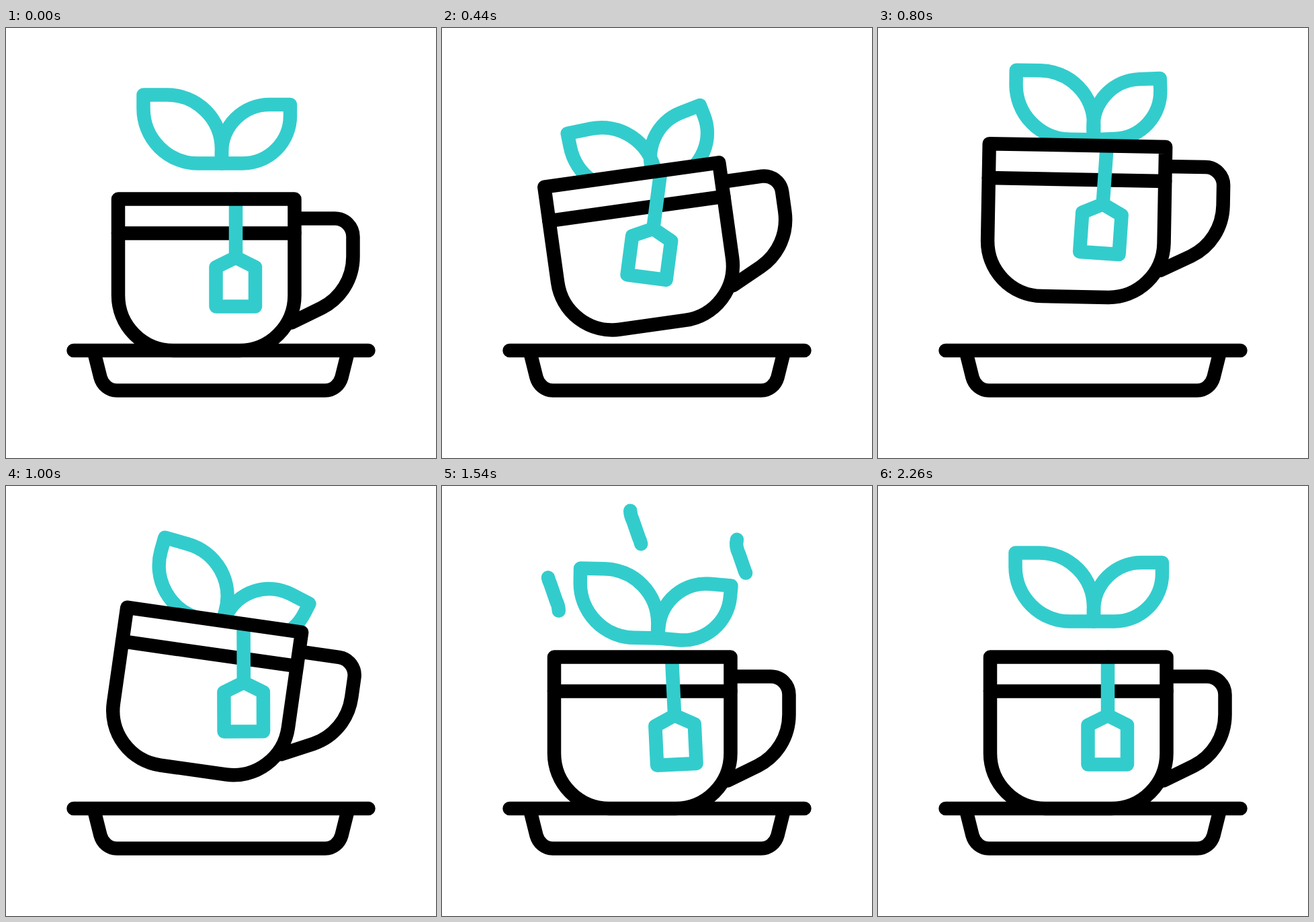
Animation of 640x640 px, one loop 2.4 s. Source, as an HTML page:

```html
<!DOCTYPE html>
<html lang="en">
<head>
<meta charset="utf-8">
<title>Tea cup</title>
<style>
  html, body { margin: 0; width: 100%; height: 100%; overflow: hidden; background: #fff; }
  svg { display: block; width: 100vw; height: 100vh; fill: none; stroke: #000;
        stroke-width: 20.5; stroke-linecap: round; stroke-linejoin: round; }
  .tea { stroke: #3cc; }
</style>
</head>
<body>
<svg viewBox="0 0 640 640">
  <g class="tea">
    <path id="leftLeaf" d="M204.5 99.5H240A81 81 0 0 1 321 180.5V201.5H286A81.5 81.5 0 0 1 204.5 120Z"/>
    <path id="rightLeaf" d="M423 114H392A71 71 0 0 0 321 185V201.5H352A71 71 0 0 0 423 130.5Z"/>
    <g id="drops"></g>
  </g>
  <path d="M100.5 480H539.5M131 482L140.5 520C143.5 531 153 539.5 165 539.5H475C487 539.5 496.500 531 499.5 520L509 482"/>
  <g id="cup">
    <path d="M429.5 283.5H489.500A27 27 0 0 1 516.500 310.5V340C516.5 373 498.5 402 470 416.500L425 438.500"/>
    <path fill="#fff" stroke="none" d="M167 254.500H429.5V398A82 82 0 0 1 347.5 480H249A82 82 0 0 1 167 398Z"/>
    <path d="M167 305.5H429.5"/>
    <path id="bag" class="tea" d="M342 254.5V341.5L371 356V414.5H312.5V356L342 341.5"/>
    <path d="M167 254.5H429.5V398A82 82 0 0 1 347.5 480H249A82 82 0 0 1 167 398Z"/>
  </g>
</svg>
<script>
const LOOP = 2400;
const $ = id => document.getElementById(id);
const clamp = v => Math.max(0, Math.min(1, v));

// Smooth curve through [time, value] pairs that never overshoots them.
function track(...keys) {
  const slope = i => (keys[i + 1][1] - keys[i][1]) / (keys[i + 1][0] - keys[i][0]);
  const tangents = keys.map((_, i) => {
    if (i === 0 || i === keys.length - 1) return 0;
    const a = slope(i - 1), b = slope(i);
    return a * b > 0 ? 2 * a * b / (a + b) : 0;
  });
  return t => {
    const i = keys.findIndex(key => key[0] > t) - 1;
    if (i < 0) return keys[keys.length - 1][1];
    const [t0, v0] = keys[i], [t1, v1] = keys[i + 1];
    const d = t1 - t0, u = (t - t0) / d, w = 1 - u;
    return v0 * w * w * (1 + 2 * u) + v1 * u * u * (3 - 2 * u)
      + d * u * w * (tangents[i] * w - tangents[i + 1] * u);
  };
}

const cupX = track([0, 0], [260, 1.2], [600, -2.2], [1000, -3.9], [1200, 0]);
const cupY = track([0, 0], [140, 0], [260, -9.4], [600, -61.8], [800, -80], [1000, -56.6], [1200, 0]);
const cupTurn = track([0, 0], [260, -7.3], [400, -8], [600, -7], [1000, 8.1], [1200, 0]);
const bagTurn = track([0, 0], [260, 10], [500, 16], [600, 15.4], [1000, -8.3], [1280, 8], [1500, -3], [1720, 0]);
const leafY = track([0, 0], [260, 18.4], [500, 34], [600, 29.6], [830, -38], [1000, 4.7],
  [1230, 41], [1280, 38.9], [1840, 10.5], [2260, 0]);
const leftTurn = track([0, 0], [260, -5.6], [600, -14.5], [1000, 15.7], [1280, -1.5], [1840, 3.8], [2260, 0]);
const rightTurn = track([0, 0], [260, -6], [600, -31.9], [1000, 27.2], [1280, 4.4], [1840, 6.2], [2260, 0]);

const drops = [[166, 205, 1220], [289, 111, 1196], [447, 161, 1165]].map(([x, y, start]) => {
  const path = document.createElementNS("http://www.w3.org/2000/svg", "path");
  path.setAttribute("d", `M${x} ${y}c9-10 10-22 4-34l-9-26c-6-12-5-24 4-34`);
  path.setAttribute("pathLength", 100);
  $("drops").append(path);
  return { path, start };
});

const move = (id, value) => $(id).setAttribute("transform", value);

function draw(t) {
  move("cup", `translate(${cupX(t)} ${cupY(t)}) rotate(${cupTurn(t)} 298 367)`);
  move("bag", `rotate(${bagTurn(t)} 341.5 254.5)`);
  move("leftLeaf", `translate(0 ${leafY(t)}) rotate(${leftTurn(t)} 321 201)`);
  move("rightLeaf", `translate(0 ${leafY(t)}) rotate(${rightTurn(t)} 321 201)`);
  for (const { path, start } of drops) {
    const head = 100 * clamp((t - start) / 440);
    const tail = 100 * clamp((t - start - 228) / 440);
    path.style.display = head > tail ? "" : "none";
    path.setAttribute("stroke-dasharray", `${head - tail} 300`);
    path.setAttribute("stroke-dashoffset", -tail);
  }
}

function tick() {
  draw(performance.now() % LOOP);
  requestAnimationFrame(tick);
}
tick();
</script>
</body>
</html>
```
